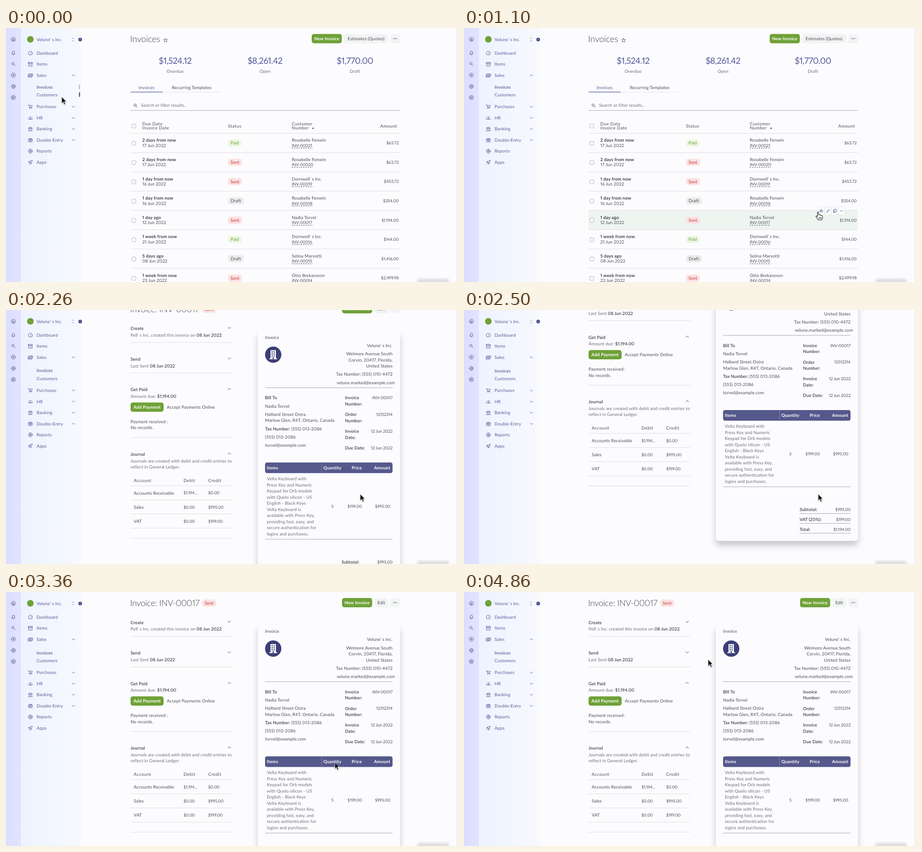
These frames come from a looping animation (998x561 px, 4.93 s). An HTML page:

```html
<!DOCTYPE html>
<html lang="en">
<head>
<meta charset="utf-8">
<title>Invoices</title>
<style>
html, body { margin: 0; width: 100%; height: 100%; overflow: hidden; background: #fcfcfe; }
svg { display: block; }
text { font: 400 9.7px Lato, "Open Sans", sans-serif; font-variant-numeric: proportional-nums; letter-spacing: .1px; fill: #4b4d55; text-rendering: geometricPrecision; white-space: pre; }
.m { font-weight: 600; fill: #3d3f48; }
.b { font-weight: 700; letter-spacing: .2px; fill: #3d3f48; }
.c { text-anchor: middle; }
.e { text-anchor: end; }
.p { fill: #5a5c98; }
.w { fill: #fff; }
.g { fill: #6d6f78; }
.h { letter-spacing: .5px; }
.n { font-size: 9.2px; letter-spacing: -.1px; }
.t { font-weight: 300; font-size: 19.5px; letter-spacing: -.15px; fill: #3f4148; }
.k { font-size: 19px; letter-spacing: -.38px; }
.v { font-weight: 400; font-size: 19px; letter-spacing: -.45px; fill: #55579c; }
.red { fill: #c7333a; }
.green { fill: #63a043; }
.i { fill: none; stroke: #5a5c98; stroke-width: 1; stroke-linecap: round; stroke-linejoin: round; }
</style>
</head>
<body>
<svg id="stage" width="998" height="561" viewBox="0 0 998 561"></svg>
<script>
const LOOP = 4930, OPEN_PAGE = 1800, MENU_READY = 1870;
const ROW_TOP = 232.5, ROW_H = 42.6;
const GREEN = '#6fa138', PURPLE = '#55588b', SOFT = '#f2f4f4', RULE = '#dcdde2';

const text = (x, y, s, cls = '') => `<text x="${x}" y="${y}" dy=".35em" class="${cls}">${s}</text>`;
const box = (x, y, w, h, fill, r = 0, more = '') =>
  `<rect x="${x}" y="${y}" width="${w}" height="${h}" rx="${r}" fill="${fill}" ${more}/>`;
const line = (x1, x2, y, color = RULE, more = '') =>
  `<path d="M${x1} ${y}H${x2}" stroke="${color}" ${more}/>`;
const icon = (x, y, d, more = '') => `<path class="i" transform="translate(${x} ${y})" d="${d}" ${more}/>`;
const disc = (x, y, r, fill) => `<circle cx="${x}" cy="${y}" r="${r}" fill="${fill}"/>`;
const group = (id, s) => `<g id="${id}">${s}</g>`;
const button = (x, w, y, label, fill, cls = 'm') =>
  box(x, y - 10.2, w, 20.4, fill, 5) + text(x + w / 2, y, label, 'c ' + cls);
const dots = (x, y, gap = 3.2, r = 1) => [-gap, 0, gap].map(d => disc(x + d, y, r, PURPLE)).join('');
const more = () => box(849, 13.3, 21, 20.4, SOFT, 5) + dots(859.3, 23.5);

const BADGES = { Paid: [30, '#edf7e0', 'green'], Sent: [31, '#fbe2e2', 'red'], Draft: [35, '#eaecec', ''] };
const badge = (x, y, kind) => {
  const [w, fill, cls] = BADGES[kind];
  return box(x, y - 8, w, 16, fill, 6) + text(x + w / 2, y, kind, 'c ' + cls);
};

const ring = r => `M${-r} 0a${r} ${r} 0 1 1 ${2 * r} 0a${r} ${r} 0 1 1 ${-2 * r} 0`;
const DOWN = 'M-3-1.5L0 1.5 3-1.5', UP = 'M-3 1.5L0-1.5 3 1.5';
const SEARCH = 'M-3.5-1a2.5 2.5 0 1 1 5 0a2.5 2.5 0 1 1-5 0M1 1L4 4';

function backdrop() {
  return `<defs>
    <linearGradient id="strip"><stop stop-color="#dcdeff"/><stop offset="1" stop-color="#e1e3ff"/></linearGradient>
    <linearGradient id="panel"><stop stop-color="#edf3ff"/><stop offset="1" stop-color="#f7f9fe"/></linearGradient>
  </defs>` + box(0, 0, 998, 561, '#fcfcfe') + box(0, 0, 33, 561, 'url(#strip)') +
    box(33, 0, 133, 561, 'url(#panel)') + box(995, 0, 1.5, 561, '#e6e6ea');
}

function skeleton() {
  const side = [23, 55, 81, 107, 158, 184].map(y => disc(16.3, y, y < 30 ? 8 : 7, '#d0d2e6')).join('');
  const bars = [[23, 68, 64], [55, 65, 74], [81, 65, 56], [107, 65, 83]].map(([y, x, w]) =>
    disc(52, y, y < 30 ? 8 : 7, '#cdd0d9') + box(x, y - 3.5, w, 7, '#cdd0d9', 3.5)).join('');
  return side + bars;
}

function menu() {
  const gear = ring(1.5) + ring(3.7) + 'M0-5V-3.7M0 5V3.7M-5 0H-3.7M5 0H3.7M-3.4-3.4L-2.7-2.7M3.4 3.4L2.7 2.7M3.4-3.4L2.7-2.7M-3.4 3.4L-2.7 2.7';
  const strip = [
    [25, ring(4.5) + ring(1.5) + 'M-3 3.2Q0 .8 3 3.2'],
    [55, 'M-3.5 2.6H3.5L2.6 1.5V-1Q2.3-3.8 0-3.8T-2.6-1V1.5ZM-.8 4.4H.8'],
    [79.5, SEARCH],
    [104, ring(4.5) + 'M0-2.3V2.3M-2.3 0H2.3'],
    [129, gear],
    [153.5, ring(4.6) + ring(1.7) + 'M-3.2-3.2L-1.2-1.2M3.2 3.2L1.2 1.2M3.2-3.2L1.2-1.2M-3.2 3.2L-1.2 1.2']
  ].map(([y, d]) => icon(16.3, y, d)).join('');
  const item = ([y, label, d, chevron]) =>
    icon(53.8, y, d) + text(67.5, y, label, 'p') + (chevron ? icon(149, y, chevron) : '');
  const top = [
    [55.5, 'Dashboard', 'M-3.4 3.4A4.6 4.6 0 1 1 3.4 3.4ZM0 1L2-1.6'],
    [80, 'Items', 'M-4.5-4H4.5V-1.8H-4.5ZM-3.9-1.8V4.2H3.9V-1.8M-1.2.4H1.2'],
    [104.5, 'Sales', 'M-3-3.2H5V2H-3ZM-5-1.5V4H3.4M1-2V.8M-1-1.6V.4M3-1.6V.4', UP]
  ].map(item).join('');
  const low = [
    [174, 'Purchases', 'M-5-4H-3.4L-1.4.8H2.6L4.4-3H-2.8M-1.4.8L-2.4 2.4H3.6M-1.9 4.3H-1.7M2.9 4.3H3.1', DOWN],
    [198.5, 'HR', 'M-1.3-1.5a1.3 1.3 0 1 1 2.6 0a1.3 1.3 0 1 1-2.6 0M-2.6 2.8Q0 .2 2.6 2.8ZM-4-.6h.2M3.8-.6h.2M-5 2.8Q-4.6 1.2-3.3 1.4M5 2.8Q4.6 1.2 3.3 1.4', DOWN],
    [223, 'Banking', 'M-4.3-1.8L0-4.4 4.3-1.8ZM-3-.3V2.6M0-.3V2.6M3-.3V2.6M-4.5 4.2H4.5', DOWN],
    [247.5, 'Double-Entry', 'M0-4.4V3.8M-4.5 4H4.5M-3.2-3H3.2M-5 .8L-3.2-3-1.4.8ZM1.4.8L3.2-3 5 .8Z', DOWN],
    [272, 'Reports', ring(4.4) + 'M0-4.4V0H4.4M0-2.2a2.2 2.2 0 1 0 2.2 2.2'],
    [296.5, 'Apps', 'M4.2-4.2Q.2-4-1.8-.2L.2 1.8Q4-.2 4.2-4.2M-1.8-.2L-4.4.2-2.4-2.4H-.6M.2 1.8L-.2 4.4 2.4 2.4V.6M-4 4L-2.2 2.2']
  ].map(item).join('');
  return strip + disc(53.8, 25, 7.3, GREEN) + text(67.5, 25.5, "Velune' s Inc.", 'p') +
    icon(148, 25.5, 'M-2-1.8L0-3.8 2-1.8M-2 1.8L0 3.8 2 1.8', 'style="stroke:#8a8ca8"') +
    disc(163.8, 25.5, 4, '#3f4183') + icon(163.6, 25.5, 'M.8-1.6L-.8 0 .8 1.6', 'style="stroke:#fff"') + top +
    group('low', text(67.5, 130.3, 'Invoices', 'p m') + text(67.5, 147.5, 'Customers', 'p') + low) +
    group('pins', box(161, 125, 2.5, 10, '#b9bde0') + box(161, 142, 2.5, 10, PURPLE));
}

const CLIENTS = ['Rosabelle Fenwin', "Dornwell' s Inc.", 'Nadia Torvel', 'Selina Marvotti', 'Otto Brekansson'];
const ROWS = [
  ['2 days from now', '17 Jun', 'Paid', 0, '$63.72'],
  ['2 days from now', '17 Jun', 'Sent', 0, '$63.72'],
  ['1 day from now', '16 Jun', 'Sent', 1, '$453.72'],
  ['1 day from now', '16 Jun', 'Draft', 0, '$354.00'],
  ['1 day ago', '12 Jun', 'Sent', 2, '$1,194.00'],
  ['1 week from now', '21 Jun', 'Paid', 1, '$144.00'],
  ['5 days ago', '08 Jun', 'Draft', 3, '$1,416.00'],
  ['1 week from now', '23 Jun', 'Sent', 4, '$2,499.98']
];

function listPage() {
  const check = y => box(278, y - 4.2, 8.6, 8.6, '#fff', 1.5, 'stroke="#a5a7b4" stroke-width=".9"');
  const totals = [['$1,524.12', 'Overdue'], ['$8,261.42', 'Open'], ['$1,770.00', 'Draft']].map(([sum, label], i) =>
    text(373.5 + 198.4 * i, 72, sum, 'v c') + text(373.5 + 198.4 * i, 96, label, 'c g')).join('');
  const rows = ROWS.map(([due, date, kind, who, sum], i) => {
    const y = 254 + ROW_H * i;
    return check(y + .5) + text(301, y - 6, due, 'b') + text(301, y + 5.5, date + ' 2022') +
      badge(490, y, kind) + text(631, y - 6, CLIENTS[who]) + text(631, y + 5.5, 'INV-000' + (21 - i), 'n') +
      line(631, 677, y + 11.2, '#44465a', 'stroke-dasharray="3 2"') + text(867, y, sum, 'n e') +
      line(275, 870, ROW_TOP + ROW_H * (i + 1));
  }).join('');
  const actions = ['M-4 0Q0-5.4 4 0Q0 5.4-4 0' + ring(1.2), 'M-3 3L-2.4 1 2-3.4 3.4-2-1 2.4Z',
    'M-1.2-3.6H3.4V1.8H-1.2ZM-3-2V3.8H1.8'].map((d, i) => icon(788.7 + 15 * i, 0, d, 'stroke-width=".9"')).join('');
  const frames = [0, 1, 2, 3].map(i =>
    box(781.2 + 15 * i, -9, 15, 18, '#fff', 3, 'stroke="#d8daea" stroke-width=".8"')).join('');
  return text(274, 24.5, 'Invoices', 't') +
    icon(352.3, 27, 'M0-4.6L1.3-1.5 4.6-1.3 2.1.9 2.9 4.1 0 2.4-2.9 4.1-2.1.9-4.6-1.3-1.3-1.5Z') +
    button(675, 66.5, 23.5, 'New Invoice', GREEN, 'b w') +
    button(746, 98, 23.5, 'Estimates (Quotes)', SOFT, '') + more() + totals +
    text(310.5, 132, 'Invoices', 'c p') + text(410, 132, 'Recurring Templates', 'c') +
    line(346, 473, 141.8, '#e2e3ea') + line(275, 346, 141.5, '#6a6cb0', 'stroke-width="1.4"') +
    icon(286, 171.2, SEARCH, 'style="stroke:#44465a"') + text(298, 171, 'Search or filter results..', 'g') +
    line(275, 870, 182, '#a3a5ae') +
    box(275, 0, 595, ROW_H, '#eef5f1', 0, 'id="hover"') +
    check(216.5) + text(301, 211.3, 'Due Date', 'h') + text(301, 221, 'Invoice Date', 'h') +
    text(505, 216.3, 'Status', 'h c') + text(631, 211.3, 'Customer', 'h') + text(631, 221, 'Number', 'h') +
    '<path d="M675.5 222.5L678 219.5 680.5 222.5Z" fill="#44465a"/>' + text(863.5, 216.3, 'Amount', 'h e') +
    line(275, 870, ROW_TOP) + rows + group('tools', frames + actions + dots(833.7, 0, 2.6, .8)) + group('card', card());
}

function card() {
  const grey = 'style="stroke:#a6a8bd"';
  return box(403, 339.5, 224, 180.5, '#dddfff', 6, 'style="filter:drop-shadow(0 1px 2px #0002)"') +
    icon(422.3, 366, 'M-1.8-1.8a1.8 1.8 0 1 1 3.6 0a1.8 1.8 0 1 1-3.6 0M-4 4Q-3.6 1.4 0 1.4T4 4Z', grey) +
    text(433, 359.5, 'INV-00017', 'b') + text(433, 371, 'Nadia Torvel') + line(433, 487, 376.8, '#55576a') +
    badge(581.5, 359.5, 'Sent') + icon(422.3, 405, 'M-3.4-4.6H3.4V4.6L0 3.1-3.4 4.6Z', grey) +
    text(433, 400, 'Invoice marked as sent!') + text(433, 411.5, '5 days ago') +
    icon(422.3, 450, 'M-4.5-4H0L4.8.6.6 4.8-4.5 0ZM-2.6-2.2h.1', grey) +
    text(433, 439, 'Velta Keyboard with Press Key...') + text(433, 450.5, '$199.00', 'n') +
    text(433, 462, 'Velta Keyboard is ...', 'g') +
    icon(422.3, 495.5, 'M2.2-2.2Q1.8-3.4 0-3.4T-2.2-1.7 0 0 2.2 1.7 0 3.4-2.2 2.2M0-5V-3.4M0 5V3.4', grey) +
    text(433, 490, 'Paid') + text(433, 501.5, 'Due') + text(613, 501.5, '$1,194.00', 'n m e');
}

function accordion() {
  const dated = (s, d) => text(275, 15, `${s} <tspan class="m">${d}</tspan>`, 'g');
  const section = (i, title, intro, body, h) => group('sec' + i,
    text(275, .3, title, 'm') + icon(493, -1.2, DOWN, `id="chev${i}" style="stroke:#3d3f48"`) + intro +
    `<svg id="body${i}" y="24" width="520" height="${h}" overflow="hidden">${body}</svg>` +
    group('rule' + i, line(275, 499.5, 0)));
  const cells = (y, a, b, c, cls = '') =>
    text(282, y, a, cls) + text(392, y, b, cls || 'n') + text(446.5, y, c, cls || 'n');
  const ledger = cells(34.5, 'Account', 'Debit', 'Credit', 'h') + line(275, 499.5, 46) +
    [['Accounts Receivable', '$1,194...', '$0.00'], ['Sales', '$0.00', '$995.00'], ['VAT', '$0.00', '$199.00']]
      .map((r, i) => cells(62 + 31.2 * i, ...r) + line(275, 499.5, 77.3 + 31.2 * i)).join('');
  return section(0, 'Create', dated("Pell' s Inc. created this invoice on", '08 Jun 2022'),
      button(275, 29.5, 14.8, 'Edit', SOFT, ''), 36) +
    section(1, 'Send', dated('Last Sent', '08 Jun 2022'), button(275, 62, 14.8, 'Send Email', PURPLE, 'b w') +
      text(373, 14.8, 'Mark Sent', 'c') + button(409.5, 59.5, 14.8, 'Share Link', SOFT, ''), 36) +
    section(2, 'Get Paid', dated('Amount due:', '$1,194.00'), button(275, 73, 14.8, 'Add Payment', GREEN, 'b w') +
      text(355, 14.8, 'Accept Payments Online') + text(275, 46.5, 'Payment received :') + text(275, 60.3, 'No records.'), 75) +
    section(3, 'Journal', text(275, 15, 'Journals are created with debit and credit entries to', 'g') +
      text(275, 28.5, 'reflect in General Ledger.', 'g'), ledger, 161);
}

function paper() {
  const column = (x, rows, cls = '') => rows.map(([y, s]) => text(x, y, s, cls)).join('');
  const tax = 'Tax Number: ';
  const goods = ['Velta Keyboard with', 'Press Key and Numeric', 'Keypad for Orb models', 'with Quelo silicon - US',
    'English - Black Keys', 'Velta Keyboard is', 'available with Press Key,', 'providing fast, easy, and',
    'secure authentication for', 'logins and purchases.'];
  const windows = [0, 1, 2].flatMap(r => [0, 1].map(c => box(586.4 + 4.4 * c, 117.6 + 4.4 * r, 2.6, 2.6, '#3d3f78'))).join('');
  const sums = [['Subtotal:', '$995.00'], ['VAT (20%):', '$199.00'], ['Total:', '$1,194.00']].map(([a, v], i) =>
    text(741, 583 + 21.8 * i, a, 'm') + text(853.5, 583 + 21.8 * i, v, 'n e') + line(741, 853.5, 591.5 + 21.8 * i, '#a3a5ae')).join('');
  return box(556, 72, 314, 580, '#fcfcfe', 7, 'style="filter:drop-shadow(0 10px 7px #0003)"') +
    text(572, 87, 'Invoice') + disc(590, 125, 18, '#3d3f78') + box(584, 115, 12, 19.5, '#fff', 1) +
    box(581.5, 133, 17, 2, '#fff') + windows + box(588.6, 130.6, 2.8, 4, '#3d3f78') +
    column(853.5, [[105, "Velune' s Inc."], [123.3, 'Welmore Avenue South'], [136.7, 'Corvin, 20417, Florida,'],
      [150.2, 'United States'], [168.3, tax + '(555) 010-4472']], 'e') +
    text(858.5, 186.5, 'velune.marked@example.com', 'e') + line(572, 853.5, 198, '#a3a5ae') +
    text(572, 220.3, 'Bill To', 'm') +
    column(572, [[238.5, 'Nadia Torvel'], [256.7, 'Halberd Street Ostra'], [270.2, 'Marlow Glen, R4T, Ontario, Canada'],
      [288.4, `<tspan class="m">${tax}</tspan>(555) 013-2086`], [306.6, '(555) 013-2086'], [324.8, 'torvel@example.com']]) +
    column(748.5, [[220.3, 'Invoice'], [233.8, 'Number:'], [257.2, 'Order'], [270.7, 'Number:'], [294.1, 'Invoice'],
      [307.6, 'Date:'], [331, 'Due Date:']], 'm') +
    column(853.5, [[220.3, 'INV-00017'], [257.2, '12512314'], [294.1, '12 Jun 2022'], [331, '12 Jun 2022']], 'n e') +
    box(572, 363, 281.5, 23.5, PURPLE, 4.5) + box(696.3, 363, 1, 23.5, '#8082b0') +
    text(576, 375, 'Items', 'b w') + text(720.7, 375, 'Quantity', 'b w c') + text(786, 375, 'Price', 'b w e') +
    text(848.5, 375, 'Amount', 'b w e') + column(576, goods.map((s, i) => [399 + 13.5 * i, s]), 'g') +
    text(720.7, 460, '5', 'n c') + text(770, 460, '$199.00', 'n c') + text(848.5, 460, '$995.00', 'n e') +
    line(572, 853.5, 532.5, '#a3a5ae') + sums;
}

function invoicePage() {
  return text(274, 24.5, 'Invoice: INV-00017', 't k') + badge(433, 24.5, 'Sent') +
    button(742, 66.5, 23.5, 'New Invoice', GREEN, 'b w') + button(813.5, 30, 23.5, 'Edit', SOFT, '') + more() +
    accordion() + paper();
}

const pointer = group('arrow', '<path d="M0 0V14.5L3.4 11.4 5.8 17 8.3 16 6 10.6H10.4Z" fill="#111" stroke="#fff" stroke-width=".9" style="filter:drop-shadow(0 1px 1px #0005)"/>') +
  group('hand', '<path d="M-1.5 1.2C-1.5-.6 1.2-.6 1.3 1.2V6.3C2.5 5.5 4 5.9 4.2 6.9 5.4 6.3 6.8 6.8 7 7.8 8.3 7.4 9.6 8.1 9.6 9.7V12.5C9.6 14.5 8.4 15.5 8.2 17.5H0C-.3 15.5-3 13.5-4.6 10.6-5.6 8.6-3.4 7.8-1.5 10ZM2 11.5V15M4.2 11.5V15M6.4 11.5V15" fill="#fff" stroke="#111" stroke-width="1.1" stroke-linejoin="round"/>');

document.getElementById('stage').innerHTML = backdrop() + group('skeleton', skeleton()) + group('menu', menu()) +
  group('list', listPage()) + group('invoice', invoicePage()) +
  box(908, 554, 70, 12, '#dedee2', 5, 'id="tab" style="filter:blur(2.5px)"') + group('cursor', pointer);

const el = {};
document.querySelectorAll('#stage [id]').forEach(n => el[n.id] = n);
const show = (id, on) => el[id].style.display = on ? '' : 'none';
const move = (id, x, y) => el[id].setAttribute('transform', `translate(${x} ${y})`);
const part = (t, a, b) => Math.min(1, Math.max(0, (t - a) / (b - a)));
const ramp = (t, a, b) => { const p = part(t, a, b); return p * p * (3 - 2 * p); };

// time, x, y of the pointer tip
const PATH = [[30, 123, 152], [530, 651, 437], [760, 651, 437], [1030, 782, 406.5], [3359, 782, 406.5], [3360, 726, 376],
  [3560, 494, 134], [3960, 494, 134], [4140, 494, 64], [4600, 494, 64], [4850, 539, 149]];

function pointerAt(t) {
  const i = PATH.findIndex(k => k[0] > t);
  if (i < 1) return PATH[i ? PATH.length - 1 : 0].slice(1);
  const [a, b] = [PATH[i - 1], PATH[i]], p = ramp(t, a[0], b[0]);
  return [a[1] + (b[1] - a[1]) * p, a[2] + (b[2] - a[2]) * p];
}

function drawList(t, x, y) {
  const row = x > 275 ? Math.floor((y - ROW_TOP) / ROW_H) : -1, top = ROW_TOP + ROW_H * row;
  show('hover', row >= 0);
  show('tools', row >= 0);
  el.hover.setAttribute('y', top);
  move('tools', 0, top + 1);
  el.card.style.opacity = ramp(t, 550, 640) - ramp(t, 780, 880);
  return row >= 0;
}

function drawInvoice(t, x) {
  const shut = ramp(t, 1830, 2100);
  const open = [
    1 - shut + ramp(t, 4370, 4430) - ramp(t, 4600, 4800),
    1 - shut + ramp(t, 3560, 3740) - ramp(t, 4060, 4260),
    1 - ramp(t, 3560, 3740) + ramp(t, 4620, 4840),
    1
  ];
  const extra = [34.5, 34.5, 75, 155];
  let y = 67;
  open.forEach((o, i) => {
    const grown = extra[i] * o;
    move('sec' + i, 0, y);
    move('rule' + i, 0, 31 + grown);
    el['body' + i].setAttribute('height', grown + (i > 2 ? 6 : 0));
    el['chev' + i].setAttribute('d', t > MENU_READY && o > .5 && (i > 1 || t > 3000) ? UP : DOWN);
    y += 67.5 + grown;
  });
  const down = 1 - Math.pow(1 - part(t, 2231, 2500), 1.73);
  move('invoice', 0, -142 * (down - ramp(t, 2780, 3000)));
  return x > 275 && x < 500;
}

function draw(t) {
  const [x, y] = pointerAt(t), onList = t < OPEN_PAGE, ready = onList || t >= MENU_READY;
  show('list', onList);
  show('invoice', !onList);
  show('menu', ready);
  show('skeleton', !ready);
  show('tab', ready);
  show('pins', t < 60);
  move('low', 0, onList ? 0 : 4 * ramp(t, MENU_READY, 2340));
  const hand = onList ? drawList(t, x, y) : drawInvoice(t, x);
  show('hand', hand);
  show('arrow', !hand);
  move('cursor', x, y);
}

const start = performance.now();
function tick() {
  draw((performance.now() - start) % LOOP);
  requestAnimationFrame(tick);
}
tick();
</script>
</body>
</html>
```
